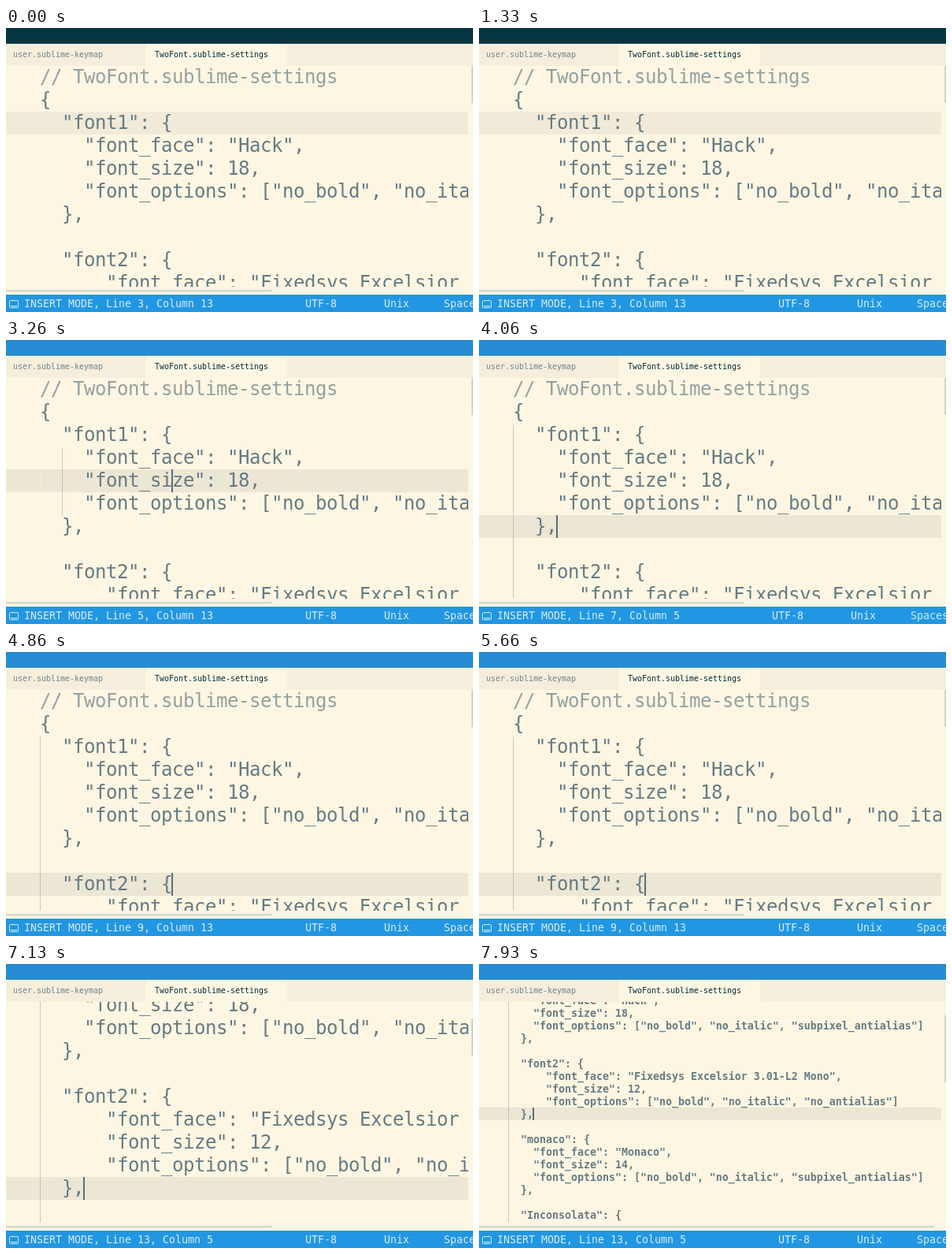
These frames come from a looping animation (593x360 px, 8 s). An HTML page:

```html
<!DOCTYPE html>
<html lang="en">
<head>
<meta charset="utf-8">
<title>Editor</title>
<style>
  html, body { margin: 0; width: 100%; height: 100%; overflow: hidden; background: #fdf6e3; }
  #stage { position: relative; width: 593px; height: 360px; overflow: hidden; background: #fdf6e3; font-family: "DejaVu Sans Mono", monospace; }
  #stage div, #stage span, #stage svg, pre { position: absolute; margin: 0; white-space: pre; }
  #title { left: 0; top: 0; width: 593px; height: 20px; }
  #tabs { left: 0; top: 20px; width: 593px; height: 28px; background: #f5eedc; font-size: 9.97px; line-height: 27px; color: #6f848b; }
  #tabs span, #status span, #info { top: 0; }
  #active { left: 177px; top: 0; width: 180px; height: 28px; background: #fdf6e3; color: #002b36; }
  #view { left: 0; top: 48px; width: 587px; height: 280px; overflow: hidden; }
  #row { left: 0; width: 587px; }
  .faint { top: 0; width: 1px; height: 100%; background: #f5eedc; }
  #guide { width: 1px; background: repeating-linear-gradient(transparent 0 1px, #93a1a1 1px 2px); }
  #caret { width: 2px; background: #586e75; }
  pre { color: #657b83; font-family: inherit; }
  #stage .comment { position: static; color: #93a1a1; }
  /* whole-pixel advance, as with hinted text */
  #large { left: 43px; font-size: 24px; line-height: 29px; letter-spacing: -.45px; }
  #small { left: 37px; padding-top: 1px; font-size: 13.29px; font-weight: bold; line-height: 16px; }
  .thumb { background: #d8d1c0; }
  #across { left: 0; top: 332px; height: 2px; }
  #down { left: 591px; width: 2px; }
  #status { left: 0; top: 338px; width: 593px; height: 22px; overflow: hidden; background: #2196e3; color: #d9eefb; font-size: 13.29px; line-height: 24px; }
  #status svg { left: 4px; top: 7px; }
</style>
</head>
<body>
<div id="stage">
  <div id="title"></div>
  <div id="tabs"><span style="left:9px">user.sublime-keymap</span><div id="active"><span style="left:12px">TwoFont.sublime-settings</span></div></div>
  <div id="view">
    <div id="row"><div class="faint"></div><div class="faint"></div></div>
    <div id="guide"></div>
    <pre id="large"></pre>
    <pre id="small"></pre>
    <div id="caret"></div>
  </div>
  <div id="across" class="thumb"></div>
  <div id="down" class="thumb"></div>
  <div id="status">
    <svg width="13" height="12" fill="none" stroke="#d9eefb"><rect x=".5" y=".5" width="11" height="9" rx="1"/><path d="M2 7.5h8"/></svg>
    <span id="mode" style="left:23px"></span>
    <div id="info"><span style="left:380px">UTF-8</span><span style="left:480px">Unix</span><span style="left:556px">Spaces: 2</span></div>
  </div>
</div>
<script>
const $ = id => document.getElementById(id);
const LOOP = 8000, FOCUS = 2130, SWITCH = 7260, VIEW = 284, LINES = 59;

const block = (name, face, size, smoothing, indent = 4) => {
  const pad = ' '.repeat(indent);
  return `  "${name}": {
${pad}"font_face": "${face}",
${pad}"font_size": ${size},
${pad}"font_options": ["no_bold", "no_italic", "${smoothing}"]
  },
`;
};
const code = '\n{\n' + [
  block('font1', 'Hack', 18, 'subpixel_antialias'),
  block('font2', 'Fixedsys Excelsior 3.01-L2 Mono', 12, 'no_antialias', 6),
  block('monaco', 'Monaco', 14, 'subpixel_antialias'),
  block('Inconsolata', 'Inconsolata', 14, 'subpixel_antialias')
].join('\n');

const fonts = {
  large: { id: 'large', left: 43, advance: 14, height: 29, thumb: 337 },
  small: { id: 'small', left: 37, advance: 8, height: 16, thumb: 578 }
};
for (const id in fonts) $(id).innerHTML = '<span class="comment">// TwoFont.sublime-settings</span>' + code;

// time, line, column
const moves = [
  [0, 3, 13], [2960, 4, 13], [3160, 5, 13], [3360, 6, 13], [3560, 7, 5],
  [4160, 8, 1], [4300, 9, 13],
  [6140, 10, 13], [6210, 11, 13], [6280, 12, 13], [6760, 13, 5]
];

const scrollFor = line => line < 10 ? 0 : 39 + 29 * (line - 10);

function scrollAt(t) {
  let scroll = 0;
  for (const [start, line] of moves) {
    if (t < start) break;
    const p = Math.min(1, (t - start) / 100);
    scroll += (scrollFor(line) - scroll) * (1 - (1 - p) ** 2);
  }
  return Math.round(scroll);
}

// column and first/last line of the indent guide around a line
function guideFor(line) {
  if (line > 3 && line < 7) return [2, 4, 6];
  if (line > 9 && line < 13) return [4, 10, 12];
  return [0, 3, LINES - 1];
}

const place = (el, box) => {
  for (const key in box) el.style[key] = box[key] + 'px';
};

function draw(t) {
  const font = t < SWITCH ? fonts.large : fonts.small;
  const focused = t >= FOCUS;
  const [, line, column] = moves.filter(m => m[0] <= t).pop();
  const scroll = font === fonts.small ? 58 : scrollAt(t);
  const rowTop = n => (n - 1) * font.height - scroll;
  const colLeft = n => font.left + n * font.advance;

  $('title').style.background = focused ? '#268bd2' : '#073642';
  $('row').style.background = focused ? '#ece6d5' : '#f1ead8';
  for (const id in fonts) {
    $(id).style.display = id === font.id ? 'block' : 'none';
    $(id).style.top = -scroll + 'px';
  }
  place($('row'), { top: rowTop(line), height: font.height });

  const [guideColumn, first, last] = guideFor(line);
  $('row').querySelectorAll('.faint').forEach((el, i) => {
    el.style.left = colLeft(2 * i) + 'px';
    el.style.display = 2 * i < guideColumn ? 'block' : 'none';
  });
  place($('guide'), { left: colLeft(guideColumn), top: rowTop(first) + 1, height: (last - first + 1) * font.height - 1 });
  place($('caret'), { left: colLeft(column - 1) - 1, top: rowTop(line), height: font.height });
  $('guide').style.display = $('caret').style.display = focused ? 'block' : 'none';

  const ratio = VIEW / (LINES * font.height);
  place($('down'), { top: 48 + Math.round(scroll * ratio), height: Math.round(VIEW * ratio) });
  place($('across'), { width: font.thumb });

  const mode = `INSERT MODE, Line ${line}, Column ${column}`;
  $('mode').textContent = mode;
  place($('info'), { left: (mode.length - 30) * 8 });
}

const start = performance.now();
function tick() {
  draw((performance.now() - start) % LOOP);
  requestAnimationFrame(tick);
}
tick();
</script>
</body>
</html>
```
